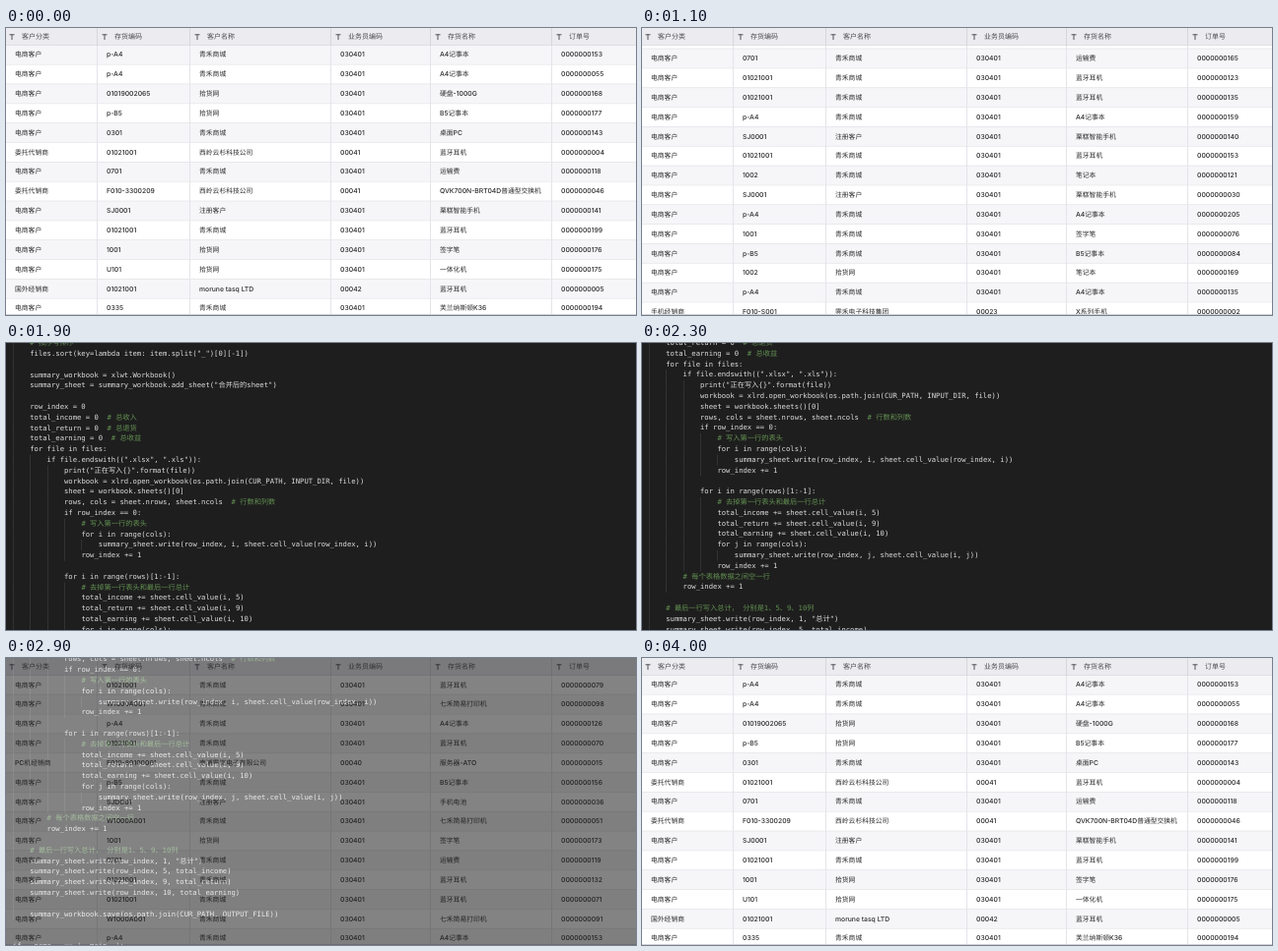
Recreate the animation shown at these times as an HTML page with a canvas. Size 639 px wide and 292 px high, loop 4100 ms.

```html
<!DOCTYPE html>
<html lang="zh-CN">
<head>
<meta charset="utf-8">
<style>
  html, body { margin: 0; width: 100%; height: 100%; overflow: hidden; background: #fff; }
  canvas { position: absolute; left: 0; top: 0; width: 639px; height: 292px; }
</style>
</head>
<body>
<canvas id="table" width="639" height="292"></canvas>
<canvas id="code" width="639" height="292"></canvas>
<script>
const W = 639, H = 292, LOOP = 4100, STEP = 100;
const codeCanvas = document.getElementById('code');
const tableCtx = document.getElementById('table').getContext('2d');
const codeCtx = codeCanvas.getContext('2d');
for (const ctx of [tableCtx, codeCtx]) {
  ctx.textBaseline = 'middle';
  ctx.textRendering = 'geometricPrecision';
}

// Keys are [ms, position, px per 100 ms], joined by cubic Hermite curves.
function follow(keys, t) {
  if (t <= keys[0][0]) return keys[0][1];
  for (let i = 1; i < keys.length; i++) {
    const [t0, p0, v0] = keys[i - 1], [t1, p1, v1] = keys[i];
    if (t > t1) continue;
    const u = (t - t0) / (t1 - t0), n = (t1 - t0) / 100, w = 1 - u;
    return p0 * (1 + 2 * u) * w * w + v0 * n * u * w * w
         + p1 * u * u * (3 - 2 * u) - v1 * n * u * u * w;
  }
  return keys[keys.length - 1][1];
}

const tableFirst = [[0, 258, 28], [1100, 532, 23], [1500, 618.8, 21], [1700, 659, 19]];
const tableSecond = [[2700, -1.6, 0], [2900, 0, 3], [3400, 70.5, 28], [4000, 258, 32]];
const codeScroll = [[1200, -69, 22], [1500, -2.4, 22], [2300, 172.6, 21], [2900, 246.9, 3], [3100, 249, 0]];

const ROW = 19.84, FIRST_ROW = 26.9, HEAD = 18;
const TABLE_FONT = 'Inter, "Noto Sans CJK SC", "Noto Sans CJK", sans-serif';
const edges = [0, 92.5, 186.5, 329.5, 430.5, 553.5];
const cellX = [9, 102, 196, 339, 440, 563];
const headX = [16, 110, 204, 347, 448, 571];
const titles = ['客户分类', '存货编码', '客户名称', '业务员编码', '存货名称', '订单号'];

const goods = {
  '01021001': '蓝牙耳机', 'W1000A001': '七禾简易打印机', 'p-A4': 'A4记事本', 'p-B5': 'B5记事本',
  'SJDC01': '手机电池', 'SJ0001': '栗糕智能手机', '1001': '签字笔', '1002': '笔记本',
  '0701': '运输费', '0301': '桌面PC', '0335': '芙兰纳斯顿K36', 'U101': '一体化机',
  '01019002065': '硬盘-1000G', 'F010-80100001': '服务器-ATO',
  'F010-3300209': 'QVK700N-BRT04D普通型交换机', 'F010-S001': 'X系列手机'
};
// Customer: name, category, sales code
const shop = (name, kind = '电商客户', agent = '030401') => ({ name, kind, agent });
const customers = {
  j: shop('青禾商城'), t: shop('拾货网'), m: shop('注册客户'),
  b: shop('西岭云杉科技公司', '委托代销商', '00041'),
  d: shop('morune tasq LTD', '国外经销商', '00042'),
  y: shop('霁禾电子科技集团', '手机经销商', '00023'),
  p: shop('南浦霁岚电子有限公司', 'PC机经销商', '00040')
};
const rows = `01021001 j 079,W1000A001 j 098,p-A4 j 126,01021001 j 070,F010-80100001 p 015,
p-B5 j 156,SJDC01 m 036,W1000A001 j 051,1001 t 173,0701 j 119,01021001 j 132,01021001 j 071,
W1000A001 j 091,p-A4 j 153,p-A4 j 055,01019002065 t 168,p-B5 t 177,0301 j 143,01021001 b 004,
0701 j 118,F010-3300209 b 046,SJ0001 m 141,01021001 j 199,1001 t 176,U101 t 175,01021001 d 005,
0335 j 194,0701 j 165,01021001 j 123,01021001 j 135,p-A4 j 159,SJ0001 m 140,01021001 j 153,
1002 j 121,SJ0001 m 030,p-A4 j 205,1001 j 076,p-B5 j 084,1002 t 169,p-A4 j 135,F010-S001 y 002,
U101 t 208,W1000A001 j 160,01021001 j 150,01021001 j 175,p-A4 j 162,1001 t 148`
  .split(',').map(line => {
    const [item, who, order] = line.trim().split(' ');
    const { name, kind, agent } = customers[who];
    return [kind, item, name, agent, goods[item], '0000000' + order];
  });

function rect(ctx, color, x, y, w, h) {
  ctx.fillStyle = color;
  ctx.fillRect(x, y, w, h);
}

function drawTable(scroll) {
  const c = tableCtx;
  rect(c, '#fff', 0, 0, W, H);
  c.font = '500 6.8px ' + TABLE_FONT;
  rows.forEach((cells, i) => {
    const y = FIRST_ROW + i * ROW - scroll;
    if (y < 0 || y > H + ROW) return;
    const top = y - ROW / 2;
    if (i % 2) rect(c, '#f6f6f9', 0, top, W, ROW);
    rect(c, '#e6e6ea', 0, top, W, 0.8);
    c.fillStyle = '#2a2a2a';
    cells.forEach((text, k) => c.fillText(text, cellX[k], y + 0.6));
  });
  edges.slice(1).forEach(x => rect(c, '#e4e4e9', x - 0.5, HEAD, 1, H));
  rect(c, '#ebebf0', 0, 0, W, HEAD);
  rect(c, '#dcdce2', 0, HEAD - 0.8, W, 0.8);
  c.font = '7px ' + TABLE_FONT;
  titles.forEach((text, k) => {
    if (k) rect(c, '#d6d6dc', edges[k] - 0.5, 0, 1, HEAD);
    c.fillStyle = '#4a4a50';
    c.fillText(text, headX[k], 9.3);
    const x = headX[k] - 12.5;
    rect(c, '#55555c', x, 6.3, 5, 1);
    rect(c, '#55555c', x + 2, 6.3, 1, 5.7);
  });
  rect(c, '#d2d2d7', 0, H - 1, W, 1);
}

const LINE = 10.8, CODE_X = 6.8, CHAR = 4.352, LEAD = 6;
const code = `import os
import xlrd
import xlwt

CUR_PATH = os.path.dirname(os.path.abspath(__file__))
OUTPUT_FILE = "总表.xls"
INPUT_DIR = "在线销售账龄表"


def merge():
    """
    批量将相同格式的表合并至一个sheet
    """
    files = os.listdir(os.path.join(CUR_PATH, INPUT_DIR))
    # 按序号排序
    files.sort(key=lambda item: item.split("_")[0][-1])

    summary_workbook = xlwt.Workbook()
    summary_sheet = summary_workbook.add_sheet("合并后的sheet")

    row_index = 0
    total_income = 0  # 总收入
    total_return = 0  # 总退货
    total_earning = 0  # 总收益
    for file in files:
        if file.endswith((".xlsx", ".xls")):
            print("正在写入{}".format(file))
            workbook = xlrd.open_workbook(os.path.join(CUR_PATH, INPUT_DIR, file))
            sheet = workbook.sheets()[0]
            rows, cols = sheet.nrows, sheet.ncols  # 行数和列数
            if row_index == 0:
                # 写入第一行的表头
                for i in range(cols):
                    summary_sheet.write(row_index, i, sheet.cell_value(row_index, i))
                row_index += 1

            for i in range(rows)[1:-1]:
                # 去掉第一行表头和最后一行总计
                total_income += sheet.cell_value(i, 5)
                total_return += sheet.cell_value(i, 9)
                total_earning += sheet.cell_value(i, 10)
                for j in range(cols):
                    summary_sheet.write(row_index, j, sheet.cell_value(i, j))
                row_index += 1
        # 每个表格数据之间空一行
        row_index += 1

    # 最后一行写入总计， 分别是1、5、9、10列
    summary_sheet.write(row_index, 1, "总计")
    summary_sheet.write(row_index, 5, total_income)
    summary_sheet.write(row_index, 9, total_return)
    summary_sheet.write(row_index, 10, total_earning)

    summary_workbook.save(os.path.join(CUR_PATH, OUTPUT_FILE))


if __name__ == '__main__':
    merge()`.split('\n');

const indentOf = i => code[i] ? code[i].search(/\S/) : i + 1 < code.length ? indentOf(i + 1) : 0;

function drawCode(scroll) {
  const c = codeCtx;
  rect(c, '#1e1e1e', 0, 0, W, H);
  c.font = '7.23px "DejaVu Sans Mono", "Noto Sans CJK SC", "Noto Sans CJK", monospace';
  code.forEach((line, i) => {
    const y = (i - LEAD) * LINE - scroll;
    if (y < -LINE || y > H + LINE) return;
    const indent = indentOf(i);
    for (let col = 0; col < indent; col += 4)
      rect(c, '#383838', Math.round(CODE_X + col * CHAR), y - LINE / 2, 0.8, LINE);
    const mark = line.indexOf('#');
    const plain = (mark < 0 ? line : line.slice(0, mark)).slice(indent);
    const x = CODE_X + indent * CHAR;
    c.fillStyle = '#dcdcdc';
    c.fillText(plain, x, y);
    if (mark >= 0) {
      c.fillStyle = '#639152';
      c.fillText(line.slice(mark), x + c.measureText(plain).width, y);
    }
  });
}

const clamp = v => Math.max(0, Math.min(1, v));

function draw(now) {
  const t = Math.floor(now % LOOP / STEP) * STEP;
  const opacity = t < 2000 ? clamp((t - 1200) / 400) : clamp((3120 - t) / 400);
  codeCanvas.style.opacity = opacity;
  if (opacity < 1) drawTable(follow(t < 2000 ? tableFirst : tableSecond, t));
  if (opacity > 0) drawCode(follow(codeScroll, t));
}

const start = performance.now();
function tick() {
  draw(performance.now() - start);
  requestAnimationFrame(tick);
}
tick();
</script>
</body>
</html>
```
